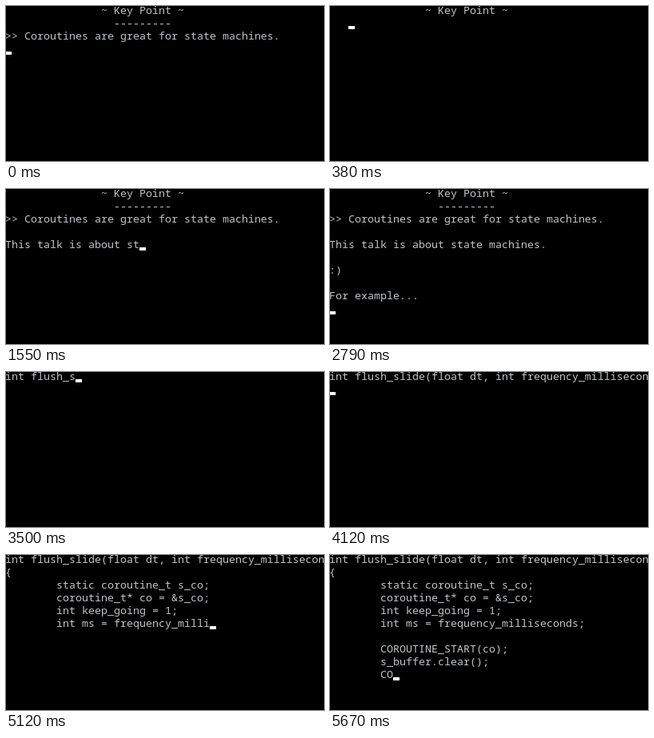
Animation of 398x194 px, one loop 5770 ms. Source, as an HTML page:

```html
<!DOCTYPE html>
<html lang="en">
<head>
<meta charset="utf-8">
<title>Typed slides</title>
<style>
html, body {
  margin: 0;
  width: 100%;
  height: 100%;
  overflow: hidden;
  background: #000;
}
#stage {
  position: relative;
  width: 398px;
  height: 194px;
  overflow: hidden;
}
#text {
  position: absolute;
  left: -1px;
  top: -3px;
  margin: 0;
  font: 10pt/16px "Noto Sans Mono", "DejaVu Sans Mono", monospace;
  font-variant-ligatures: none;
  color: #c0c4c8;
  tab-size: 8;
  white-space: pre;
}
#cursor {
  position: absolute;
  left: -1px;
  top: 9px;
  width: 8px;
  height: 4px;
  background: #fff;
}
</style>
</head>
<body>
<div id="stage"><pre id="text"></pre><div id="cursor"></div></div>
<script>
const LOOP = 5770, CELL_W = 8, CELL_H = 16;
const textEl = document.getElementById('text');
const cursorEl = document.getElementById('cursor');

// Each part: start time, ms per character, typed text
const talk = [
  [70, 9.5, ' '.repeat(15) + '~ Key Point ~\n' + ' '.repeat(17) + '---------\n' +
    '>> Coroutines are great for state machines.\n'],
  [1330, 10, '\nThis talk is about state machines.\n'],
  [2140, 1, '\n:)\n'],
  [2600, 10, '\nFor example...\n']
];
const code = [
  [3370, 10, 'int flush_slide(float dt, int frequency_milliseconds)'],
  [4110, 10, `
{
\tstatic coroutine_t s_co;
\tcoroutine_t* co = &s_co;
\tint keep_going = 1;
\tint ms = frequency_milliseconds;

\tCOROUTINE_START(co);
\ts_buffer.clear();
\tCO`]
];

// Evenly spread redraw times on a 10 ms grid
const spread = (from, to, count) => Array.from({ length: count },
  (_, i) => Math.round((from + (to - from) * i / (count - 1)) / 10) * 10);

const ticks = [
  0, ...spread(60, 590, 11), ...spread(660, 840, 5), ...spread(900, 1040, 4),
  ...spread(1350, 1550, 5), ...spread(1610, 1720, 3), 2150, ...spread(2650, 2790, 4),
  ...spread(3380, 3900, 11), ...spread(4120, 4660, 12), ...spread(4720, 5120, 10),
  5150, 5200, 5260, ...spread(5300, 5430, 4), ...spread(5490, 5670, 4)
];

function typed(parts, t) {
  return parts.map(([start, rate, text]) =>
    text.slice(0, Math.max(0, Math.floor((t - start) / rate)))).join('');
}

function screenAt(t) {
  if (t < 60) return talk[0][2];
  return typed(t < 3380 ? talk : code, t);
}

let shown = -1;
function draw(t) {
  const tick = ticks.findLast(k => k <= t);
  if (tick === shown) return;
  shown = tick;
  const screen = screenAt(tick);
  const lines = screen.replace(/\t/g, ' '.repeat(8)).split('\n');
  const row = lines.length - 1, col = lines[row].length;
  textEl.textContent = screen;
  cursorEl.style.transform = `translate(${col * CELL_W}px, ${row * CELL_H}px)`;
}

const begin = performance.now();
function frame() {
  draw((performance.now() - begin) % LOOP);
  requestAnimationFrame(frame);
}
frame();
</script>
</body>
</html>
```
